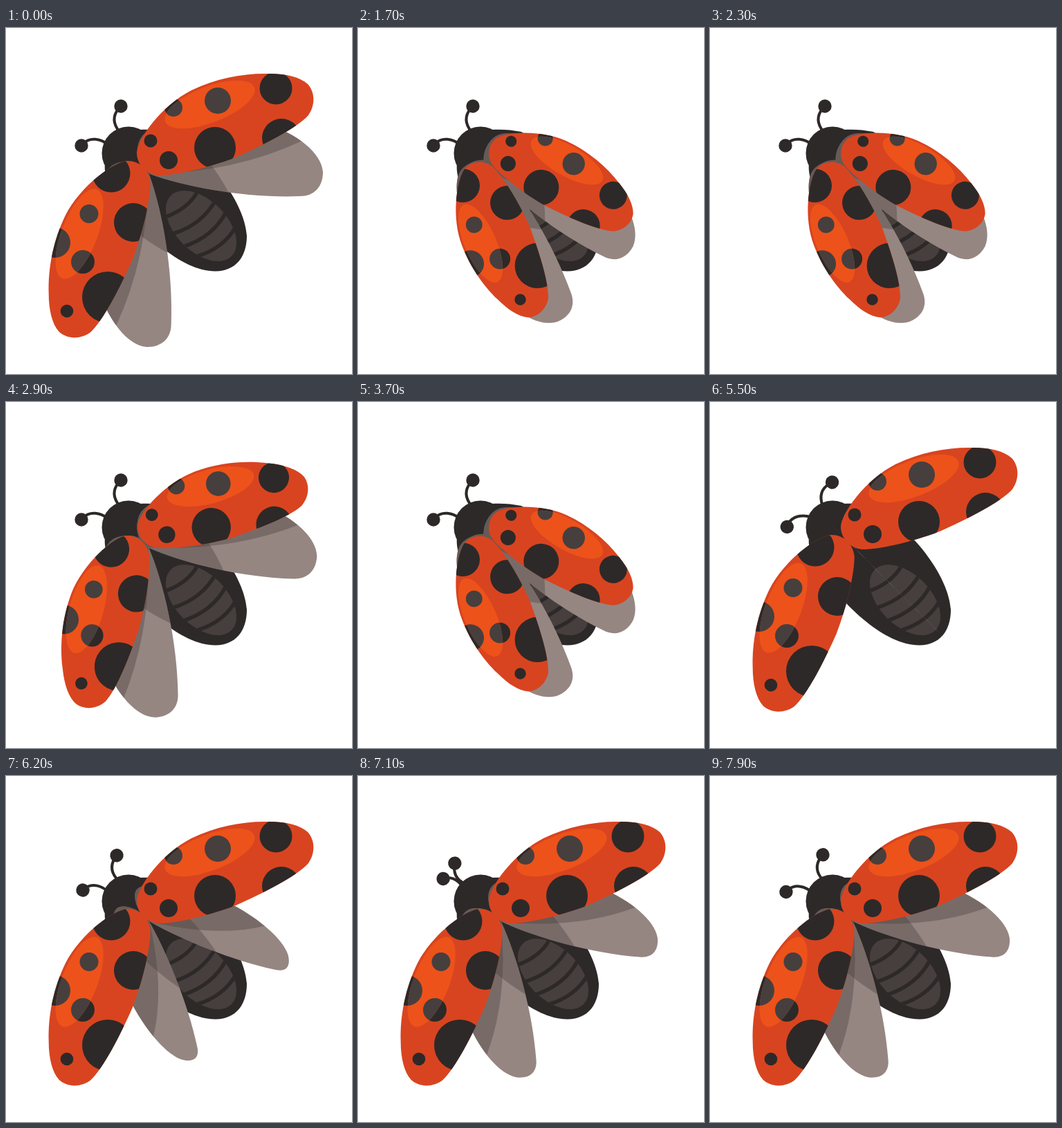
An HTML page for the animation above (8000 ms loop, 500 px wide and 500 px high).

```html
<!DOCTYPE html>
<html lang="en">
<head>
<meta charset="utf-8">
<title>Ladybug</title>
<style>
  html, body { margin: 0; width: 100%; height: 100%; overflow: hidden; background: #fff; }
  svg { display: block; width: 100%; height: 100%; }
  .dark { fill: #2d2928; }
  .red { fill: #d84420; }
  .shine { fill: #ed521a; }
  .dim { fill: #463f3e; }
  .wing { fill: #958682; }
  .shade { fill: #463b39; opacity: .36; }
  .line { fill: none; stroke: #2d2928; stroke-width: 4; }
</style>
</head>
<body>
<svg viewBox="0 0 500 500">
  <defs>
    <path id="shell" d="M189 180C190 160 225 112 268 90C305 72 345 65 380 66C405 66 425 71 436 81C447 93 447 112 437 126C420 145 370 170 332 187C290 203 245 213 220 213C202 211 189 197 189 180Z"/>
    <ellipse id="gloss" cx="294.5" cy="110.5" rx="69" ry="26" transform="rotate(-21 294.5 110.5)"/>
    <path id="wing" d="M190 180C190 160 198 150 220 142C270 124 330 122 378 139C420 153 456 180 458 208C458 230 445 243 425 243C350 246 262 231 208 211C196 205 190 193 190 180Z"/>
    <ellipse id="belly" cx="282" cy="286" rx="62" ry="37" transform="rotate(45 282 286)"/>
    <clipPath id="wingClip"><use href="#wing"/></clipPath>
    <clipPath id="bellyClip"><use href="#belly"/></clipPath>
    <clipPath id="shellR"><use href="#shell"/></clipPath>
    <clipPath id="glossR"><use href="#gloss"/></clipPath>
    <clipPath id="shellL"><use href="#shell" transform="matrix(0 1 1 0 -4.3 3)"/></clipPath>
    <clipPath id="glossL"><use href="#gloss" transform="matrix(0 1 1 0 -4.3 3)"/></clipPath>
    <g id="wingArt">
      <use href="#wing" class="wing"/>
      <g clip-path="url(#wingClip)">
        <path class="shade" d="M208 211Q330 209 428 163L420 100L170 100L170 200Z"/>
        <path class="shade" d="M170 90L262 160Q300 195 324 242L170 260Z"/>
      </g>
    </g>
  </defs>

  <g id="antL">
    <path class="line" d="M147 168C136 160 122 157 111 167"/>
    <circle class="dark" cx="109" cy="170" r="9.7"/>
  </g>
  <g id="antR">
    <path class="line" d="M164 150C155 139 153 128 163 116"/>
    <circle class="dark" cx="166" cy="113" r="9.7"/>
  </g>

  <path class="dark" d="M143 195C141 216 150 232 163 250C195 295 253 352 303 351.5C332 351 348 331 348 300C345 255 300 190 236 150C222 147 206 146 193 147Z"/>
  <circle class="dark" cx="177" cy="181" r="38.5"/>
  <use href="#belly" class="dim"/>
  <path clip-path="url(#bellyClip)" class="line" style="stroke-width:5.5" d="M277 236Q263 262 228 274M304 247Q284 284 242 297M319 264Q300 302 256 316M332 287Q315 318 276 330"/>

  <g id="wingL"><use href="#wingArt" transform="matrix(0 1 1 0 -4.3 3)"/></g>
  <g id="wingR"><use href="#wingArt"/></g>
  <g id="elyL"></g>
  <g id="elyR"></g>
</svg>
<script>
const el = id => document.getElementById(id);

// Dots are dark on the shell and lighter where the gloss covers them
function buildShell(side, spots) {
  const flip = side === 'L' ? 'transform="matrix(0 1 1 0 -4.3 3)"' : '';
  const dots = spots.map(([x, y, r]) => `<circle cx="${x}" cy="${y}" r="${r}"/>`).join('');
  el('ely' + side).innerHTML =
    `<use href="#shell" class="red" ${flip}/>` +
    `<g class="dark" clip-path="url(#shell${side})">${dots}</g>` +
    `<g clip-path="url(#shell${side})"><use href="#gloss" class="shine" ${flip}/>` +
    `<g class="dim" clip-path="url(#gloss${side})">${dots}</g></g>`;
}

buildShell('R', [[390, 87, 23.5], [306, 105, 19], [302, 173, 30], [235, 191, 13],
  [209, 163, 9.5], [242, 115, 13], [398, 159, 28]]);
buildShell('L', [[152, 210, 27.5], [184, 281, 28], [120, 268.5, 13.5], [111, 338, 17],
  [71, 310, 22], [147, 389, 37], [88, 409, 9.3]]);

const tri = (t, period) => {
  const p = (t % period) / period * 2;
  return p < 1 ? p : 2 - p;
};

// Affine map (a b / c d by columns) that keeps (x, y) fixed
function setMap(id, a, b, c, d, x, y) {
  const e = x - a * x - c * y, f = y - b * x - d * y;
  el(id).setAttribute('transform', `matrix(${a} ${b} ${c} ${d} ${e} ${f})`);
}

// Points travel in straight lines towards a rotated pose
function swing(id, deg, k, x, y) {
  const q = deg * Math.PI / 180;
  const a = 1 + k * (Math.cos(q) - 1), b = k * Math.sin(q);
  setMap(id, a, b, -b, a, x, y);
}

// Squeeze towards the body axis
function fold(id, k) {
  setMap(id, 1 - k / 2, k / 2, k / 2, 1 - k / 2, 208, 210);
}

function turn(id, deg, x, y, dx, dy) {
  el(id).setAttribute('transform', `translate(${dx} ${dy}) rotate(${deg} ${x} ${y})`);
}

function draw(t) {
  const close = t > 1000 && t < 5000 ? tri(t - 1000, 2000) : 0;
  swing('elyR', 70, close, 217, 176);
  swing('elyL', -62, close, 173, 223);

  if (t < 5000) {
    swing('wingR', 40, close, 204, 166);
    swing('wingL', -31, close, 170, 218);
  } else {
    const k = tri(t - 5000, 1000);
    fold('wingR', k);
    fold('wingL', k);
  }

  const spread = t > 4000 && t < 6000 ? tri(t - 4000, 2000) : 0;
  const meet = t > 6000 ? tri(t - 6000, 2000) : 0;
  const deg = 37 * spread - 40 * meet;
  turn('antR', deg, 162, 147, -6 * meet, 10 * meet);
  turn('antL', -deg, 142, 168, 10 * meet, -2 * meet);
}

const start = performance.now();
function tick() {
  const t = (performance.now() - start) % 8000;
  draw(Math.floor(t / 100) * 100);
  requestAnimationFrame(tick);
}
tick();
</script>
</body>
</html>
```
